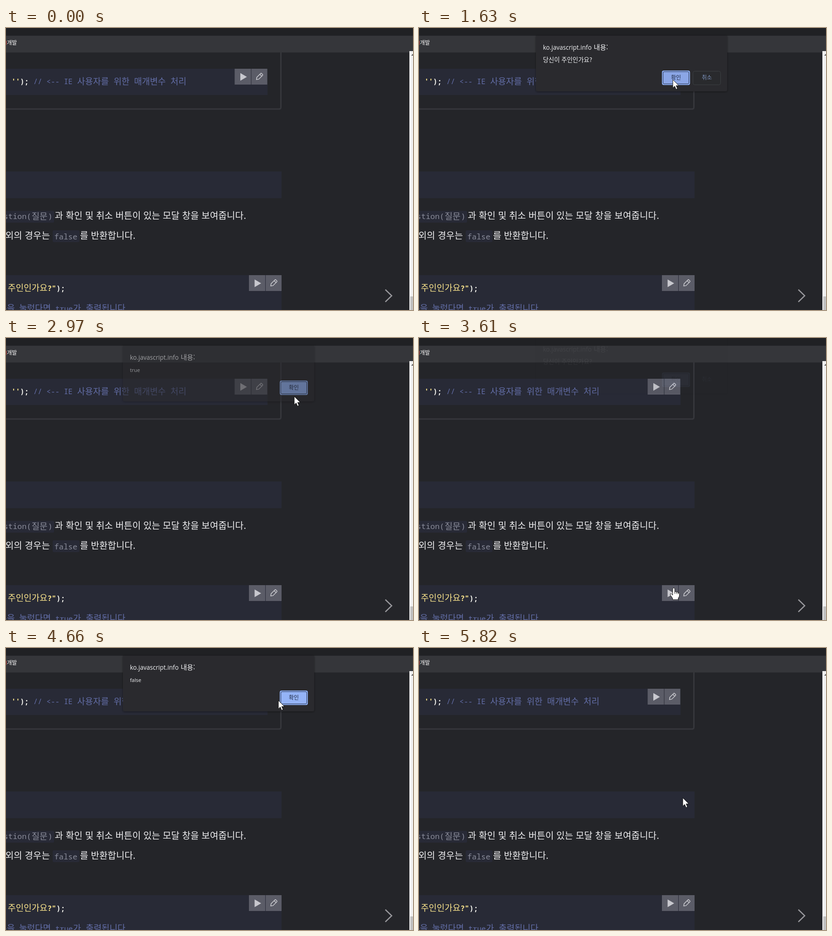
Animation of 898x623 px, one loop 5.9 s. Source, as an HTML page:

```html
<!DOCTYPE html>
<html lang="ko">
<head>
<meta charset="utf-8">
<style>
html, body { margin: 0; width: 100%; height: 100%; overflow: hidden; background: #242529; }
svg { display: block; }
text { white-space: pre; font-family: "Noto Sans CJK KR", "Noto Sans CJK", sans-serif; }
.prose { font-size: 20.2px; fill: #f0f0f2; }
.code { font-size: 19px; }
.mono { font: 16px "Noto Sans Mono", monospace; }
.inline { font-size: 17px; fill: #8a8c9a; }
.comment { fill: #626da6; }
.string { fill: #fbe58c; }
.plain { fill: #f8f8f2; }
.bold { font-weight: 700; }
.ui { font-family: "Open Sans", "Noto Sans", sans-serif; fill: #f4f5f7; }
.block { fill: #282a36; }
.label { font-size: 12px; text-anchor: middle; }
</style>
</head>
<body>
<svg width="898" height="623" viewBox="0 0 898 623">
  <defs>
    <g id="tools">
      <path d="M0 0h36v35H0zM37 0h35v35H37z" fill="#5b5c67"/>
      <path d="M12.500 9.500v17l14.500-8.500z" fill="#c8c8ce"/>
      <g transform="translate(54.500 17.500) rotate(45)" fill="none" stroke="#cfcfd4" stroke-width="1.500">
        <path d="M-3 -7q0-1.500 1.500-1.500h3q1.500 0 1.500 1.500V5L0 9L-3 5zM-3 -4.500h6"/>
      </g>
    </g>
    <g id="ok">
      <rect width="62" height="32" rx="4" fill="#8fb0f3"/>
      <rect x="2.500" y="2.500" width="57" height="27" rx="2.500" stroke="#26304a"/>
      <text class="label" x="31" y="19.500" fill="#202b45">확인</text>
    </g>
    <filter id="shadow" x="-5%" y="-10%" width="110%" height="125%">
      <feDropShadow dx="0" dy="1" stdDeviation="2" flood-opacity=".45"/>
    </filter>
  </defs>

  <rect width="898" height="623" fill="#242529"/>
  <path d="M606.500 50V175q0 4-4 4H-5" fill="none" stroke="#36373c" stroke-width="3"/>
  <rect width="898" height="17" fill="#202124"/>
  <rect y="17" width="898" height="37" fill="#35363a"/>
  <rect y="28" width="1" height="9" fill="#d8443c"/>
  <text x="2" y="37" font-size="12" fill="#fff">개발</text>

  <rect class="block" y="90" width="577" height="58"/>
  <rect class="block" y="317" width="608" height="59"/>
  <rect class="block" y="546" width="608" height="77"/>
  <use href="#tools" x="504.500" y="90"/>
  <use href="#tools" x="536" y="546"/>

  <text class="mono bold string" x="12" y="124">''</text>
  <text class="mono bold plain" x="31" y="124">);</text>
  <text class="mono comment" x="60.500" y="124">// &lt;-- IE</text>
  <g class="code comment">
    <text x="157" y="124.500">사용자를</text>
    <text x="237.500" y="124.500">위한</text>
    <text x="282.500" y="124.500">매개변수</text>
    <text x="363" y="124.500">처리</text>
  </g>

  <rect class="block" x="-5" y="404" width="111" height="26" rx="3"/>
  <rect class="block" x="103" y="447" width="59" height="26" rx="3"/>
  <text class="mono inline" x="-5.500" y="422">stion(</text>
  <text class="code inline" x="56.500" y="423" style="font-size:19px">질문</text>
  <text class="mono inline" x="92.500" y="422">)</text>
  <text class="prose" x="107.500" y="422">과 확인 및 취소 버튼이 있는 모달 창을 보여줍니다.</text>
  <text class="prose" x="-1.500" y="466">외의 경우는</text>
  <text class="mono inline" x="106.500" y="467">false</text>
  <text class="prose" x="163" y="466">를 반환합니다.</text>

  <text class="code string" x="4" y="580.500">주인인가요</text>
  <text class="mono bold string" x="91.500" y="581">?"</text>
  <text class="mono bold plain" x="111" y="581">);</text>
  <g class="code comment">
    <text x="-15.500" y="626">튼을</text>
    <text x="29" y="626">눌렀다면</text>
    <text class="mono" x="109" y="626">true</text>
    <text x="148" y="626">가</text>
    <text x="176" y="626">출력됩니다</text>
  </g>

  <path d="M837 578l14 13.500L837 605" fill="none" stroke="#98989c" stroke-width="2.500"/>
  <rect x="890" y="51" width="8" height="572" fill="#f1f1f1"/>
  <rect x="892" y="593" width="6" height="30" fill="#c1c1c1"/>
  <path d="M894 61l4-4v4z" fill="#505050"/>

  <g id="dialog">
    <path d="M258 17h422v119q0 4-4 4H262q-4 0-4-4z" fill="#292a2d" filter="url(#shadow)"/>
    <text class="ui" x="273.500" y="48" font-size="13.600">ko.javascript.info</text>
    <text x="385.500" y="48" font-size="15" fill="#f4f5f7">내용:</text>
    <text id="question" x="273.500" y="74.500" font-size="13.400" fill="#f4f5f7">당신이 주인인가요?</text>
    <text id="answer" class="ui" x="273.500" y="74.500" font-size="11.400"></text>
    <g id="cancel">
      <rect x="604.500" y="95.500" width="61" height="30" rx="4" stroke="#3c4043"/>
      <text class="label" x="635" y="114" fill="#8098c4">취소</text>
    </g>
    <use id="okButton" href="#ok" y="94"/>
  </g>

  <g id="cursor" fill="#fff" stroke="#111" stroke-width="1" stroke-linejoin="round">
    <path id="arrow" d="M0 0V18.500L4.200 14.500L7.200 21.500L10.300 20.200L7.300 13.300H13.300z"/>
    <path id="hand" d="M-2.300 1.500Q0-1.500 2.300 1.500V8.500Q5 7.500 6 9.500Q9 8.500 9.500 10.700Q12.500 10.500 12.500 13.500V17Q12.500 20 10 22.500V26H-2.500V23L-7.500 15.500Q-8.500 12.500-5.500 13L-2.300 16zM2.300 8.500V13M6 9.500V13.500M9.500 10.700V14"/>
    <circle id="click" r="15" cy="-1" fill="#ff0" fill-opacity=".53" stroke="none"/>
  </g>
</svg>
<script>
const LOOP = 5900, START = 330, STEP = 67.8;
const $ = id => document.getElementById(id);
const clamp = v => Math.max(0, Math.min(1, v));
const show = (id, on) => $(id).style.display = on ? '' : 'none';

// time, x, y of the pointer
const path = [
  [330, 677, 598], [870, 545, 563], [940, 547, 563], [1076, 551, 549], [1140, 551, 546],
  [1480, 565, 129], [1690, 558, 108], [2090, 553, 104], [2160, 553, 104], [2560, 638, 118],
  [2930, 638, 118], [3400, 562, 557], [3584, 562, 552], [3660, 562, 550], [4020, 624, 145],
  [4330, 636, 111], [4420, 636, 111], [4800, 588, 118], [5279, 623, 114], [5420, 623, 114],
  [5822, 582, 331]
];
const clicks = [[900, 990], [1650, 1750], [2830, 2930], [3440, 3540], [4260, 4390], [5200, 5330]];
// opening time, closing time, answer (empty for the question)
const dialogs = [[996, 1750, ''], [1890, 2930, 'true'], [3580, 4395, ''], [4470, 5340, 'false']];

function pointerAt(t) {
  const i = path.findIndex(k => k[0] > t);
  if (i < 1) return path.at(i).slice(1);
  const [t0, x0, y0] = path[i - 1], [t1, x1, y1] = path[i];
  const p = (t - t0) / (t1 - t0), e = p * p * (3 - 2 * p);
  return [x0 + (x1 - x0) * e, y0 + (y1 - y0) * e];
}

function drawDialog(t, x, y) {
  const current = dialogs.find(d => t >= d[0] && t < d[1] + 100);
  show('dialog', current);
  if (!current) return;
  const [open, close, answer] = current;
  const p = clamp((t - open) / 150), fade = 1 - clamp((t - close) / 100);
  $('dialog').setAttribute('transform', `translate(0 ${-18.3 * (1 - p)})`);
  $('dialog').setAttribute('opacity', (1 - (1 - p) ** 2) * fade);
  $('answer').textContent = answer;
  show('question', !answer);
  show('cancel', !answer);
  const left = answer ? 604 : 536;
  const over = bx => x > bx && x < bx + 62 && y > 95 && y < 126;
  $('okButton').setAttribute('x', left);
  $('okButton').setAttribute('fill', over(left) ? '#8ba6e6' : '#94b3f6');
  $('cancel').setAttribute('fill', over(604) ? '#30363d' : '#292a2d');
}

function draw(now) {
  const raw = now % LOOP;
  const t = START + Math.floor((raw - START + 12) / STEP) * STEP;
  const [x, y] = pointerAt(t);
  const onPlay = x > 536 && x < 608 && y > 545 && y < 581;
  drawDialog(t, x, y);
  show('cursor', raw >= START);
  $('cursor').setAttribute('transform', `translate(${Math.round(x)} ${Math.round(y)})`);
  show('hand', onPlay);
  show('arrow', !onPlay);
  show('click', clicks.some(([from, to]) => t >= from && t < to));
}

const begin = performance.now();
(function frame() {
  draw(performance.now() - begin);
  requestAnimationFrame(frame);
})();
</script>
</body>
</html>
```
